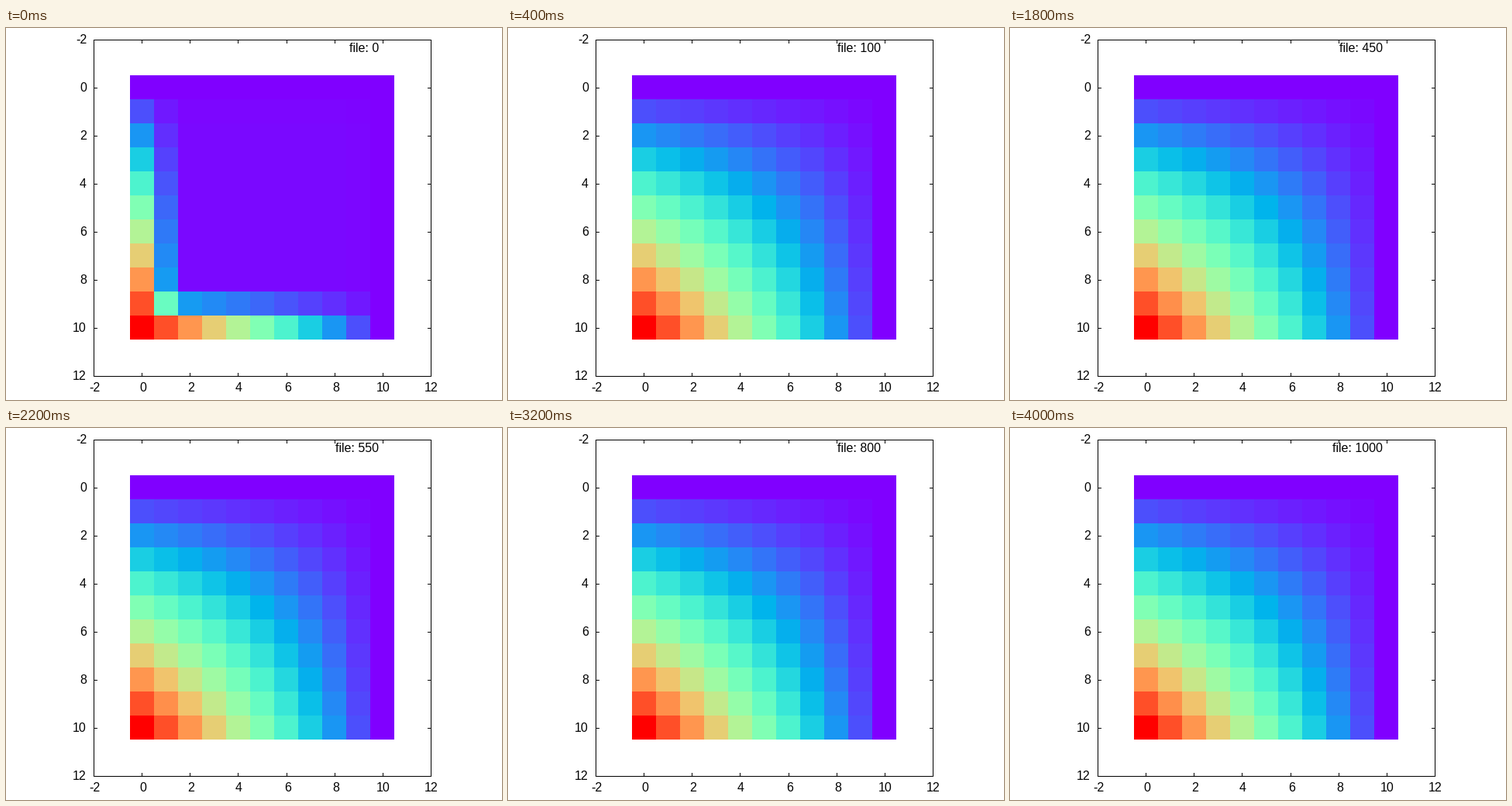
Animation, 640 px wide and 480 px high, one loop 4200 ms. Source, as a matplotlib script:

```python
import matplotlib.pyplot as plt
import numpy as np
from matplotlib.animation import FuncAnimation

W, H, DPI = 640, 480, 100
PX = 72 / DPI
LEFT, RIGHT, TOP, BOTTOM = 113, 548, 15, 449
TICK = 5
FRAMES, STEP = 21, 50
N = 11

plt.rcParams["font.family"] = "Liberation Sans"
plt.rcParams["text.hinting"] = "default"


def relax(u):
    """One Jacobi sweep of the Laplace equation with fixed edges."""
    v = u.copy()
    v[1:-1, 1:-1] = (u[:-2, 1:-1] + u[2:, 1:-1] + u[1:-1, :-2] + u[1:-1, 2:]) / 4
    return v


def solve():
    """Fields after 1, 51, 101, ... sweeps."""
    ramp = np.linspace(0, 1, N)
    u = np.full((N, N), 0.01)
    u[0, :] = u[:, -1] = 0
    u[:, 0] = ramp
    u[-1, :] = ramp[::-1]
    fields = []
    for sweep in range((FRAMES - 1) * STEP + 1):
        u = relax(u)
        if sweep % STEP == 0:
            fields.append(u)
    return fields


def rainbow(u):
    """Continuous violet-to-red palette as 8-bit RGB."""
    rgb = np.stack([abs(2 * u - 0.5), np.sin(np.pi * u), np.cos(np.pi * u / 2)], axis=-1)
    return np.rint(255 * np.clip(rgb, 0, 1)).astype(np.uint8)


fig = plt.figure(figsize=(W / DPI, H / DPI), dpi=DPI, facecolor="white")
ax = fig.add_axes([0, 0, 1, 1])


def line(x0, y0, x1, y1):
    ax.plot([x0, x1], [y0, y1], color="black", lw=PX, solid_capstyle="butt", snap=False)


def label(x, y, text):
    return ax.text(x, y, text, ha="left", va="baseline", fontsize=16 * PX, color="black")


def advance(text):
    """Pixel width of a label, used to align it on whole pixels."""
    return sum(9 if c.isdigit() or c == "e" else 5 if c == "-" else 4 for c in text)


images = [rainbow(u) for u in solve()]
image = ax.imshow(images[0], aspect="auto", interpolation="nearest",
                  extent=(160, 501, 402, 61))

for y in (TOP + 0.5, BOTTOM + 0.5):
    line(LEFT, y, RIGHT + 1, y)
for x in (LEFT + 0.5, RIGHT + 0.5):
    line(x, TOP, x, BOTTOM + 1)

for k, value in enumerate(range(-2, 13, 2)):
    x = LEFT + round(k * (RIGHT - LEFT) / 7)
    y = TOP + round(k * (BOTTOM - TOP) / 7)
    line(x + 0.5, TOP, x + 0.5, TOP + TICK)
    line(x + 0.5, BOTTOM + 1 - TICK, x + 0.5, BOTTOM + 1)
    line(LEFT, y + 0.5, LEFT + TICK, y + 0.5)
    line(RIGHT + 1 - TICK, y + 0.5, RIGHT + 1, y + 0.5)
    text = str(value)
    label(x + 1 - advance(text) // 2, 469, text)
    label(104 - advance(text), y + 5, text)

counter = label(0, 31, "")

ax.set_xlim(0, W)
ax.set_ylim(H, 0)
ax.axis("off")


def update(i):
    text = f"file: {i * STEP}"
    image.set_data(images[i])
    counter.set_text(text)
    counter.set_x(481 - advance(text))
    return image, counter


anim = FuncAnimation(fig, update, frames=FRAMES, interval=200, repeat=True,
                     repeat_delay=0, blit=False)
plt.show()
```
